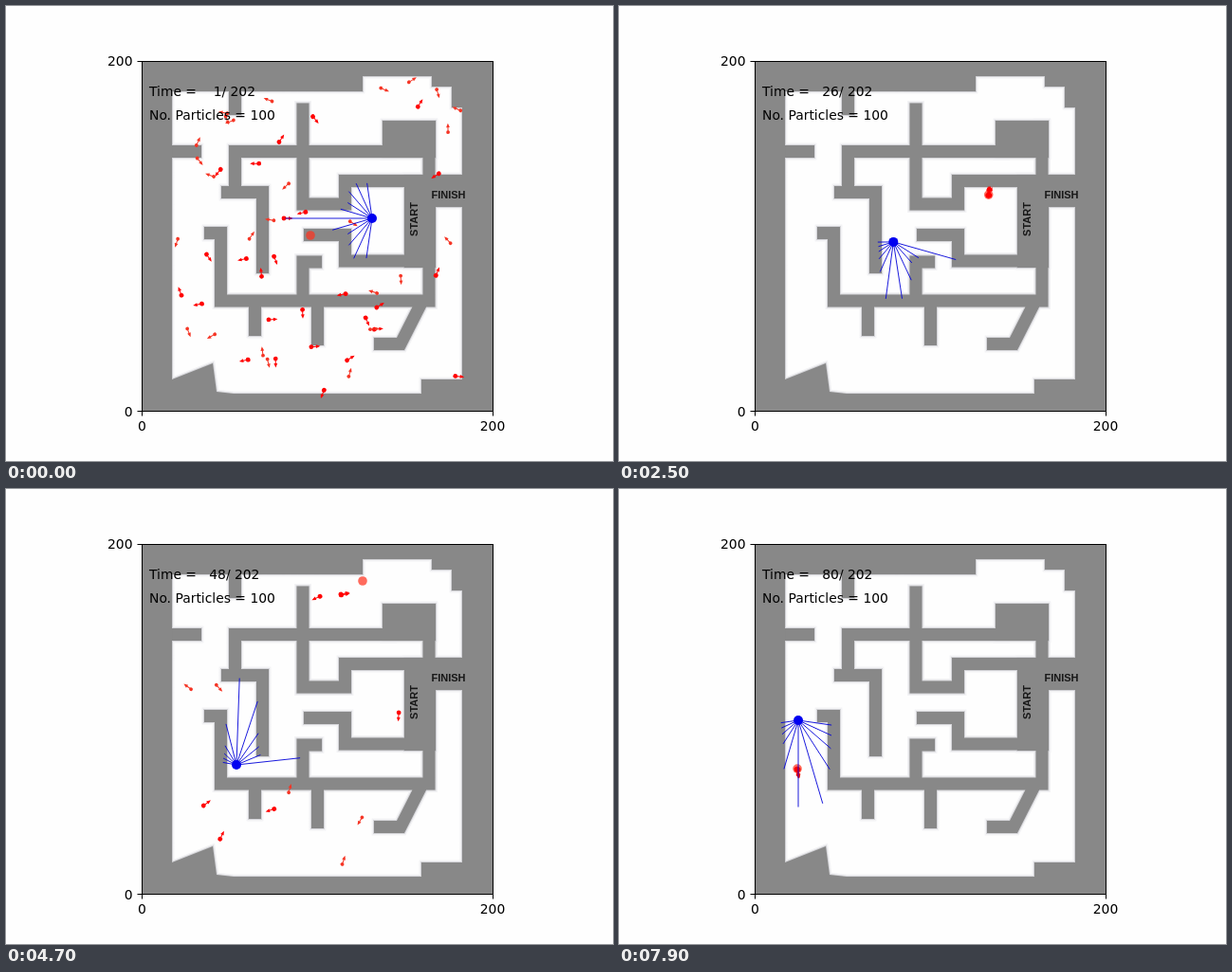
An HTML page with a canvas for the animation above (8000 ms loop, 640 by 480 pixels).

```html
<!DOCTYPE html>
<html lang="en">
<head>
<meta charset="utf-8">
<title>Particle filter in a maze</title>
<style>
html, body { margin: 0; width: 100%; height: 100%; overflow: hidden; background: #fefefe; }
canvas { display: block; }
</style>
</head>
<body>
<canvas id="stage" width="640" height="480"></canvas>
<script>
const ctx = document.getElementById('stage').getContext('2d');
const STEP = 100, STEPS = 80, RANGE = 91, WALL = 13, CROWD = 52, RAD = Math.PI / 180;

// Outer block with the open area cut out by opposite winding, then the three thick blocks
const solid = new Path2D(`M143 58H514V428H143Z
  M175 90V394L218 377 222 407 240 409H438V394H481V107H470V85H449V74H376V90Z
  M397 121H453V160H397Z M420 178H453V276H420Z M439 178H513V212H439Z`);
// Centre lines of the thin walls
const thin = new Path2D(`M168 153.5H199.5 M241.5 85V108.5 M313 109V209H357.5V184.5H446
  M403 153.5H241.5V196.5 M233.5 196.5H270.5V275.5 M446 127.5V311H226.5V239.5H215.5
  M320.5 241.5H357.5V269H446 M326.5 270H313V311 M262.5 311V341.5 M328.5 311V351.5
  M435.5 318L416 356.5H394.5`);

function isWall(x, y) {
  ctx.lineWidth = WALL;
  return ctx.isPointInPath(solid, x, y) || ctx.isPointInStroke(thin, x, y);
}

// Robot path: step, x, y, heading in degrees
const path = [
  [1, 386, 224, 180], [17, 310, 224, 180], [20, 296, 225, 168], [23, 289, 236, 100],
  [33, 290, 279, 92], [36, 288, 289, 110], [39, 277, 292, 180], [44, 252, 293, 190],
  [48, 243, 291, 272], [59, 244, 241, 270], [62, 243, 229, 265], [65, 233, 223, 195],
  [72, 203, 222, 180], [75, 192, 223, 160], [77, 188, 230, 105], [80, 189, 244, 90]
];
// Each phase scatters a new crowd; its lead, posed at step `key`, is the one that survives
const phases = [
  { start: 1, key: 1, lead: [293, 224, 0], mean: [321, 242] },
  { start: 29, key: 33, lead: [363, 137, 185], mean: [344, 181] },
  { start: 44, key: 48, lead: [353, 111, -12], mean: [376, 97] },
  { start: 65, key: 72, lead: [198, 271, 170], mean: [260, 302] }
];

const mix = (a, b, u) => a + (b - a) * u;
function random(i) {
  const v = Math.sin(i * 127.1 + 11.7) * 43758.5453;
  return v - Math.floor(v);
}

function robotAt(n) {
  const i = Math.max(1, path.findIndex(p => p[0] >= n));
  const a = path[i - 1], b = path[i], u = (n - a[0]) / (b[0] - a[0]);
  return [1, 2, 3].map(j => mix(a[j], b[j], u));
}

// Particles repeat the robot's motion from their own pose
function follow([x, y, heading], from, to) {
  const turn = (heading - from[2]) * RAD, c = Math.cos(turn), s = Math.sin(turn);
  const dx = to[0] - from[0], dy = to[1] - from[1];
  return [x + dx * c - dy * s, y + dx * s + dy * c, heading + to[2] - from[2]];
}

function scatter(seed) {
  const crowd = [];
  for (let i = seed; crowd.length < CROWD; i += 3) {
    const x = 177 + 303 * random(i), y = 76 + 331 * random(i + 1);
    if (!isWall(x, y)) crowd.push([x, y, 360 * random(i + 2)]);
  }
  return crowd;
}

function disc(x, y, r, color) {
  ctx.fillStyle = color;
  ctx.beginPath();
  ctx.arc(x, y, r, 0, 7);
  ctx.fill();
}

function line(x1, y1, x2, y2, width = 1) {
  ctx.lineWidth = width;
  ctx.beginPath();
  ctx.moveTo(x1, y1);
  ctx.lineTo(x2, y2);
  ctx.stroke();
}

function drawParticle([x, y, heading], bold) {
  const color = ctx.strokeStyle = bold ? '#f00' : '#f53525';
  ctx.save();
  ctx.translate(x, y);
  ctx.rotate(heading * RAD);
  line(0, 0, 7, 0);
  disc(0, 0, bold ? 2.4 : 1.9, color);
  ctx.beginPath();
  ctx.moveTo(9.5, 0);
  ctx.lineTo(5, -1.9);
  ctx.lineTo(5, 1.9);
  ctx.fill();
  ctx.restore();
}

function drawParticles(n, robot) {
  const phase = phases.findLast(p => p.start <= n);
  const age = n - phase.start, share = Math.exp(-age / 2.5);
  const lead = follow(phase.lead, robotAt(phase.key), robot);
  const u = Math.min(1, Math.max(0, (n - phase.key) / 6));
  disc(mix(phase.mean[0], lead[0], u), mix(phase.mean[1], lead[1], u), 4.8, 'rgba(255,50,30,.72)');

  const origin = robotAt(phase.start);
  phase.crowd.forEach((pose, i) => {
    const q = follow(pose, origin, robot);
    if (random(i * 7 + 5) < share && !isWall(q[0], q[1])) drawParticle(q, i % 2);
  });
  // Copies gather around the lead
  for (let i = 0; i < Math.min(7, 1 + age / 2); i++) {
    const jitter = (size, k) => i && size * (random(i + k) - .5);
    drawParticle([lead[0] + jitter(2.4, 0), lead[1] + jitter(2.4, 9), lead[2] + jitter(16, 20)], true);
  }
}

function drawRobot([x, y, heading]) {
  ctx.strokeStyle = '#0000d8';
  for (let i = -5; i <= 5; i++) {
    const a = (heading + i * 16.36) * RAD, c = Math.cos(a), s = Math.sin(a);
    let d = 0;
    while (d < RANGE && !isWall(x + c * d, y + s * d)) d++;
    d = Math.min(RANGE, d + 3);
    line(x, y, x + c * d, y + s * d, .9);
  }
  disc(x, y, 5, '#0000f0');
}

function text(s, x, y, align = 'left') {
  ctx.textAlign = align;
  ctx.fillText(s, x, y);
}

function drawMaze() {
  ctx.fillStyle = '#fefefe';
  ctx.fillRect(0, 0, 640, 480);
  ctx.save();
  ctx.beginPath();
  ctx.rect(143, 58, 371, 370);
  ctx.clip();
  for (const [rim, color] of [[5, '#f3f3f5'], [2, '#d6d6da'], [0, '#888']]) {
    ctx.strokeStyle = ctx.fillStyle = color;
    ctx.lineWidth = WALL + rim;
    ctx.stroke(thin);
    ctx.lineWidth = rim || .1;
    ctx.stroke(solid);
  }
  ctx.fill(solid);
  ctx.restore();

  ctx.fillStyle = '#181818';
  ctx.font = 'bold 11px "Liberation Sans", sans-serif';
  text('FINISH', 466.5, 203, 'center');
  ctx.save();
  ctx.translate(433.5, 225);
  ctx.rotate(-Math.PI / 2);
  text('START', 0, 0, 'center');
  ctx.restore();
}

function drawAxes(n) {
  ctx.strokeStyle = ctx.fillStyle = '#000';
  ctx.lineWidth = 1;
  ctx.strokeRect(143.5, 58.5, 370, 369);
  for (const x of [143.5, 513.5]) line(x, 428, x, 432);
  for (const y of [58.5, 427.5]) line(139, y, 143, y);
  ctx.font = '13.89px "DejaVu Sans", sans-serif';
  text('0', 143.5, 448, 'center');
  text('200', 513, 448, 'center');
  text('200', 133.5, 63, 'right');
  text('0', 133.5, 433, 'right');
  text('Time = ' + String(n).padStart(4) + '/ 202', 151, 95);
  text('No. Particles = 100', 151, 120);
}

function frame() {
  const n = 1 + Math.floor((performance.now() - begin) / STEP) % STEPS;
  const robot = robotAt(n);
  drawMaze();
  drawParticles(n, robot);
  drawRobot(robot);
  drawAxes(n);
  requestAnimationFrame(frame);
}

ctx.lineCap = 'square';
phases.forEach((phase, i) => phase.crowd = scatter(i * 1000));
const begin = performance.now();
requestAnimationFrame(frame);
</script>
</body>
</html>
```
